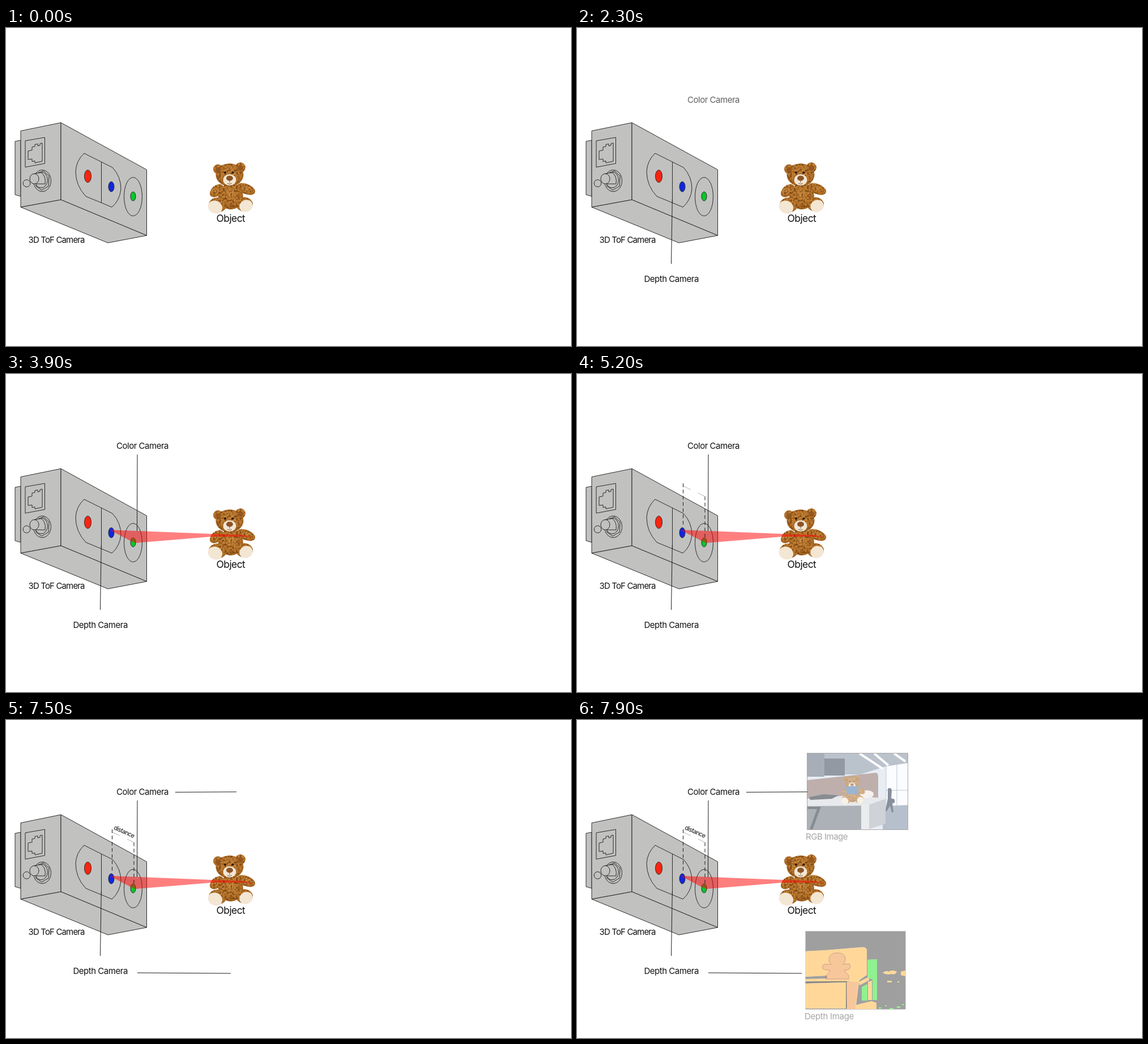
An HTML page for the animation above (8000 ms loop, 998 by 561 pixels).

```html
<!DOCTYPE html>
<html lang="en">
<head>
<meta charset="utf-8">
<title>3D ToF Camera</title>
<style>
html, body { margin: 0; width: 100%; height: 100%; overflow: hidden; background: #fff; }
svg { display: block; width: 998px; height: 561px; }
text { font: 15px Inter, "Liberation Sans", sans-serif; letter-spacing: -.48px; fill: #111; }
.line { fill: none; stroke: #1c1c1c; stroke-width: 1; }
.camera { fill: #c1c2c0; stroke: #2b2b2b; stroke-width: 1; stroke-linejoin: round; }
.green { fill: var(--green); }
</style>
</head>
<body>
<svg viewBox="0 0 998 561">
  <defs>
    <radialGradient id="fur" cx=".5" cy=".4" r=".62">
      <stop offset="0" stop-color="#cd8d40"/>
      <stop offset=".65" stop-color="#bd7a2e"/>
      <stop offset="1" stop-color="#a0621f"/>
    </radialGradient>
    <filter id="plush" color-interpolation-filters="sRGB">
      <feTurbulence type="fractalNoise" baseFrequency=".3" numOctaves="2" seed="4"/>
      <feColorMatrix values="0 0 0 0 .4  0 0 0 0 .2  0 0 0 0 .03  2.400 0 0 0 -1"/>
      <feComposite in2="SourceGraphic" operator="atop"/>
    </filter>
    <clipPath id="photoClip"><rect x="407" y="59" width="177" height="134"/></clipPath>
    <clipPath id="depthClip"><rect x="403.500" y="372.500" width="177" height="138"/></clipPath>

    <g id="bear">
      <g fill="url(#fur)" filter="url(#plush)">
        <circle cx="374.500" cy="249" r="8.500"/>
        <circle cx="414" cy="246" r="9"/>
        <ellipse cx="372" cy="287" rx="14" ry="9" transform="rotate(-42 372 287)"/>
        <ellipse cx="424" cy="284" rx="17" ry="9" transform="rotate(22 424 284)"/>
        <ellipse cx="397" cy="297" rx="22" ry="23"/>
        <ellipse cx="374" cy="312" rx="16" ry="13"/>
        <ellipse cx="421" cy="311" rx="15" ry="12.500"/>
        <ellipse cx="395" cy="259" rx="24.500" ry="20"/>
      </g>
      <g fill="#94571e">
        <circle cx="375" cy="250" r="4.500"/>
        <circle cx="414" cy="247" r="5"/>
      </g>
      <g fill="#f3e6d3">
        <ellipse cx="395" cy="268" rx="11.500" ry="10"/>
        <ellipse cx="369.500" cy="316" rx="13" ry="11" transform="rotate(25 369.500 316)"/>
        <ellipse cx="424" cy="314" rx="12" ry="10.500" transform="rotate(-25 424 314)"/>
      </g>
      <ellipse cx="395" cy="265" rx="6" ry="4.500" fill="#8a5428"/>
      <path d="M395 269v4m-4 1q4 3 8 0" class="line" style="stroke:#7b5a3c"/>
      <circle cx="387" cy="255" r="2" fill="#2a1608"/>
      <circle cx="400.500" cy="255" r="2" fill="#2a1608"/>
    </g>

    <g id="depthShapes">
      <path d="M403 408L440 406 500 401Q512 400 512 406V450L500 458 497 463 476 461H403V457L442 456 441 451 403 453Z"/>
      <path d="M403 465L475 463V509H403ZM476 462H498L492 510H477ZM498 462L516 453V459L499 468ZM514 462L521 460V494H514ZM492 503L520 496 529 499V510H492Z"/>
      <path d="M540 446q6-5 11-2q6-4 14 0q-3 6-10 4q-8 2-15-2zM548 460h8v3h-8zM572 444l8-2v10l-8-2zM566 461h3v2h-3z"/>
      <path class="green" d="M513 423L530 422V494H522V458L513 454ZM503 471L513 466V495H503Z"/>
      <path class="green" d="M533 507h5v2h-5zM544 503h3v2h-3zM552 508h7v2h-7zM565 505h6v3h-6zM574 501h4v2h-4z"/>
    </g>
  </defs>

  <g class="camera">
    <path d="M16 200L26 198V297L16 294Z"/>
    <path d="M26 181.500L97 167V303L26 316Z"/>
    <path d="M97 167L248.500 250V366L97 303Z"/>
    <path d="M26 316L97 303 248.500 366 180 379Z"/>
    <path d="M34 199L68.500 193V239L34 245.500Z"/>
    <path d="M64 203V235L51 238V234.500L46 235.500V231L39 232V217L46 215.500V210L51 209V205.500L56 204.500V208L60 207V204Z"/>
    <circle cx="36.500" cy="274" r="6.300"/>
    <ellipse cx="64" cy="269.500" rx="15.500" ry="19"/>
    <path d="M54 258L66 252 76 261 75 279 63 286 53 279Z"/>
    <ellipse cx="62" cy="268" rx="11.500" ry="14"/>
    <path d="M50 257L62 255Q71 261 69 275L52 275Z"/>
    <ellipse cx="50" cy="266" rx="8" ry="9"/>
    <path d="M138 221L188 246Q203 262 203 284Q201 304 187 316L141 297Q123 278 123 253Q124 234 138 221Z"/>
    <path d="M168.500 236V308"/>
    <ellipse cx="224.500" cy="297.500" rx="16" ry="34"/>
    <ellipse cx="144.500" cy="261.500" rx="6" ry="11" fill="#fb2410"/>
    <ellipse cx="186" cy="280" rx="5" ry="9" fill="#1026e0"/>
    <ellipse cx="224.500" cy="297" rx="4.500" ry="8" fill="#08c828"/>
  </g>
  <text x="39.500" y="378.500" style="letter-spacing:-.85px">3D ToF Camera</text>

  <use href="#bear"/>
  <text x="371.500" y="341.500" style="font-size:17.500px;letter-spacing:-.6px">Object</text>

  <path class="line" data-draw="200 800" d="M168.300 302L166.500 416"/>
  <text x="118.500" y="447.500" data-fade="700 1500">Depth Camera</text>

  <text x="195" y="131.500" data-fade="1900 2500">Color Camera</text>
  <path class="line" data-draw="2400 2900" d="M232 142L231.500 277"/>

  <path data-fade="3300 3900" fill="#f00" fill-opacity=".5" d="M183 275L362 282 420 284 438 288 420 287 362 287 229 298 221 295Z"/>

  <g class="line" data-fade="4600 5200">
    <path d="M187.500 193V270M226 216V292" stroke-dasharray="6.500 4.500"/>
    <path d="M188 198L201 204M214 210L226 216" stroke="#b4b4b4"/>
  </g>
  <text data-fade="5700 6600" transform="translate(189.500 192.500) rotate(24)" style="font-size:11px;letter-spacing:-.7px">distance</text>

  <path class="line" data-draw="6700 7300" d="M299 127.400L407 126.800"/>
  <path class="line" data-draw="6700 7300" d="M232 446L397 447"/>

  <g clip-path="url(#photoClip)">
    <g data-fade="7535 8196">
      <path fill="#d6e0ec" d="M407 59H584V193H407Z"/>
      <path fill="#8492a4" d="M407 59H584V76L545 82 500 96H407Z"/>
      <path fill="#626e7e" d="M407 59H437V100H407Z"/>
      <path fill="#3d4858" d="M437 68H473V98H437Z"/>
      <path stroke="#fff" stroke-width="4" d="M499 59L540 86M525 59L550 80M560 59L580 73"/>
      <path fill="#f7faff" d="M546 82L584 76V152H546Z"/>
      <path stroke="#8ea0b4" d="M546 80V155M565 79V152M546 124H584"/>
      <path fill="#7d8ea6" d="M540 152L584 150V193H540Z"/>
      <path fill="#27364e" d="M549 121q6-3 7 3l-1 14 6 2v6l-4 1 2 16h-3l-3-12-6 10-2-1 4-22z"/>
      <path fill="#8a6f6b" d="M407 106L528 93Q532 94 532 100V137L407 142Z"/>
      <path fill="#6a737e" d="M407 148H506V193H407Z"/>
      <path fill="#d7d9dd" d="M407 139L480 133 545 138 512 151 407 152Z"/>
      <path fill="#a9aeb6" d="M514 150L545 139V183L514 193Z"/>
      <path fill="#dcdee2" d="M502 150L516 148V193H502Z"/>
      <path fill="#27303b" d="M410 136L436 131 462 133 450 139 412 141ZM407 153H431L416 193H411L424 157H407Z"/>
      <ellipse cx="512" cy="131" rx="12" ry="7" fill="#eee6e2"/>
      <use href="#bear" transform="translate(286 -36) scale(.506 .566)"/>
      <path fill="#4f78ad" d="M475 118Q486 115 498 118L496 131H476Z"/>
    </g>
  </g>
  <g data-fade="7540 8500">
    <rect x="406.500" y="58.500" width="178" height="135" class="line"/>
    <text x="404" y="210.500">RGB Image</text>
    <rect x="403.500" y="372.500" width="177" height="138"/>
    <text x="402" y="528" style="letter-spacing:-.3px">Depth Image</text>
  </g>
  <g clip-path="url(#depthClip)">
    <use href="#depthShapes" fill="#fff" style="--green:#fff" data-show="7600"/>
    <g data-fade="7535 8196">
      <use href="#depthShapes" fill="#ffb848" style="--green:#37e637"/>
      <path fill="#f09a4a" stroke="#a4522c" d="M449 431Q442 424 447 416Q452 410 460 411Q469 410 473 417Q476 425 470 431L481 430Q485 436 480 440L472 442 480 451V457H440V451L448 442 436 440Q431 436 436 431Z"/>
      <path fill="#f09a4a" d="M477 462H497L491 510H478Z"/>
      <path fill="none" stroke="#57402a" d="M403 463L476 461V508"/>
    </g>
  </g>
</svg>
<script>
const LOOP = 8000, STEP = 100;

function collect(name) {
  return [...document.querySelectorAll(`[data-${name}]`)].map(el => {
    const [from, to] = el.dataset[name].split(' ').map(Number);
    return { el, from, to };
  });
}

const draws = collect('draw'), fades = collect('fade'), shows = collect('show');
const progress = (t, { from, to }) => Math.max(0, Math.min(1, (t - from) / (to - from)));

for (const { el } of draws) {
  el.setAttribute('pathLength', 1);
  el.style.strokeDasharray = '1 2';
}

function render(now) {
  const t = Math.floor(now % LOOP / STEP) * STEP;
  for (const d of draws) {
    const p = progress(t, d);
    d.el.style.strokeDashoffset = 1 - p;
    d.el.style.visibility = p ? 'visible' : 'hidden';
  }
  for (const f of fades) f.el.style.opacity = progress(t, f);
  for (const s of shows) s.el.style.visibility = t >= s.from ? 'visible' : 'hidden';
}

const start = performance.now();
function tick() {
  render(performance.now() - start);
  requestAnimationFrame(tick);
}
tick();
</script>
</body>
</html>
```
